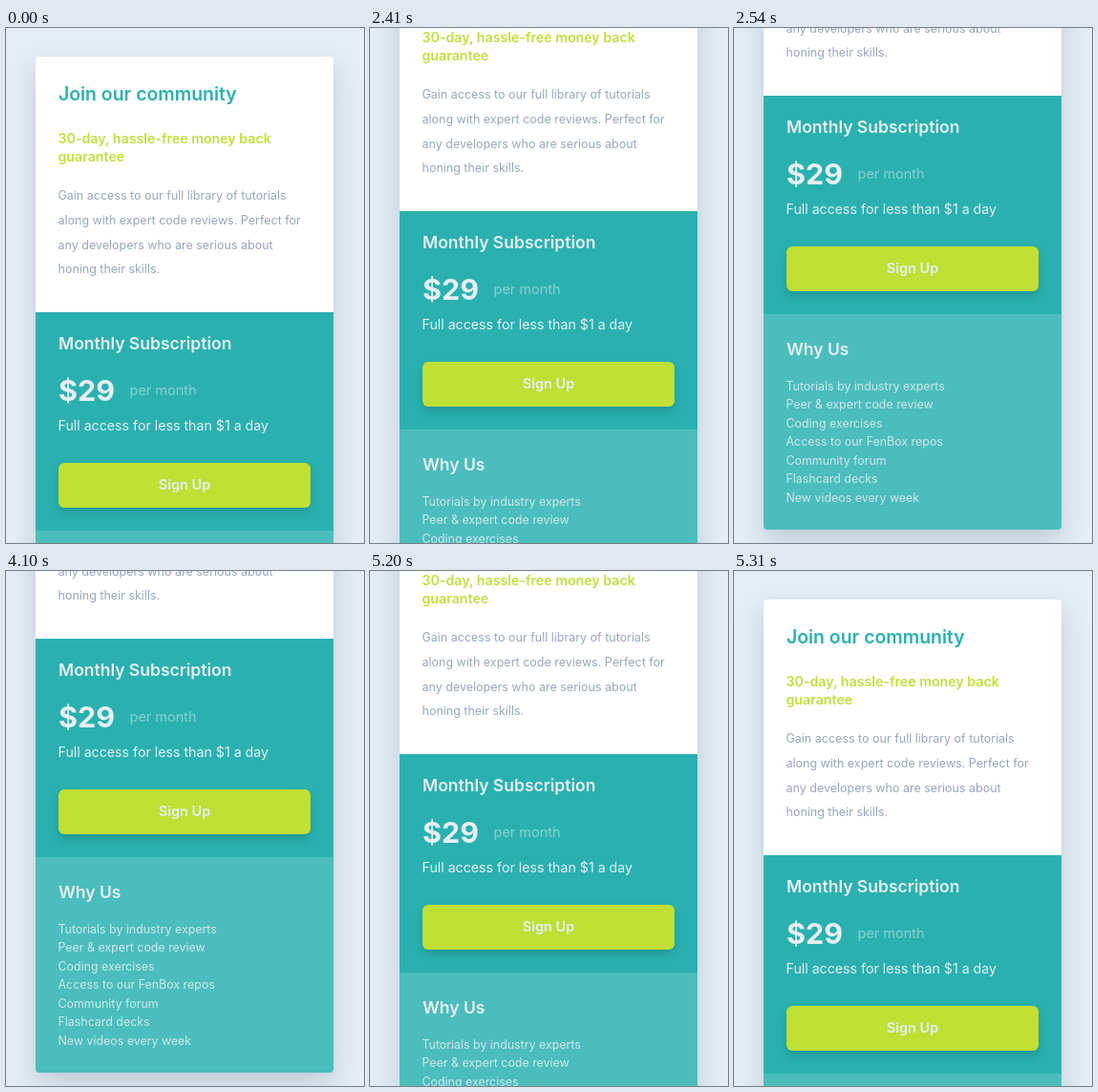
These frames come from a looping animation (375 by 540 pixels, 5.34 s). An HTML page:

```html
<!DOCTYPE html>
<html lang="en">
<head>
<meta charset="utf-8">
<title>Subscription card</title>
<style>
  html, body { margin: 0; width: 100%; height: 100%; overflow: hidden; background: #e5eef5; }
  #stage { position: relative; width: 100%; height: 100%; overflow: clip; contain: strict; }
  #page { position: absolute; left: 0; top: 0; width: 375px; height: 783px; }
  #card {
    position: absolute; left: 31px; top: 30px; width: 312px; height: 723px;
    border-radius: 4px; box-shadow: 0 12px 30px rgba(50, 75, 105, .22);
    background: linear-gradient(#fff 268px, #2ab1af 268px 497px, #4abdbc 497px);
  }
  #button {
    position: absolute; left: 55px; top: 456px; width: 264px; height: 47px;
    border-radius: 6px; background: #bfdf34; box-shadow: 0 5px 10px rgba(0, 60, 70, .22);
  }
  svg { position: absolute; left: 0; top: 0; }
  text { font-family: Inter, Arial, sans-serif; font-optical-sizing: none; fill: #e6eff5; }
  .title { font-size: 19.4px; font-weight: 600; fill: #2bb0ae; }
  .offer { font-size: 14.2px; font-weight: 600; fill: #bfdf40; }
  .body { font-size: 12.5px; fill: #98a6bd; }
  .head { font-size: 17.5px; font-weight: 600; }
  .price { font-size: 30.5px; font-weight: 700; }
  .per { font-size: 14.5px; opacity: .5; }
  .note { font-size: 14.2px; }
  .sign { font-size: 14.5px; font-weight: 600; text-anchor: middle; }
  .item { font-size: 12.4px; opacity: .85; }
</style>
</head>
<body>
<div id="stage">
  <div id="page">
    <div id="card"></div>
    <div id="button"></div>
    <svg id="copy" width="375" height="783"></svg>
  </div>
</div>
<script>
const page = document.getElementById('page');
const copy = document.getElementById('copy');

function write(style, x, y, gap, ...lines) {
  lines.forEach((line, i) => {
    const t = document.createElementNS('http://www.w3.org/2000/svg', 'text');
    t.setAttribute('class', style);
    t.setAttribute('x', x);
    t.setAttribute('y', y + i * gap);
    t.textContent = line;
    copy.append(t);
  });
}

write('title', 55, 76, 0, 'Join our community');
write('offer', 54.5, 121, 19, '30-day, hassle-free money back', 'guarantee');
write('body', 54.5, 180, 25.75,
  'Gain access to our full library of tutorials',
  'along with expert code reviews. Perfect for',
  'any developers who are serious about',
  'honing their skills.');
write('head', 55, 337, 0, 'Monthly Subscription');
write('price', 55, 391, 0, '$29');
write('per', 129.5, 385, 0, 'per month');
write('note', 54.5, 422, 0, 'Full access for less than $1 a day');
write('sign', 187, 484, 0, 'Sign Up');
write('head', 55, 570, 0, 'Why Us');
write('item', 54.5, 607, 19.45,
  'Tutorials by industry experts',
  'Peer & expert code review',
  'Coding exercises',
  'Access to our FenBox repos',
  'Community forum',
  'Flashcard decks',
  'New videos every week');

// Scroll wheel jumps: [start in ms, scroll offset in px]
const LOOP = 5340;
const jumps = [[0, 0], [2410, 106], [2480, 219], [2540, 227], [5140, 219], [5200, 106], [5270, 0]];
const start = performance.now();

function draw() {
  const t = (performance.now() - start) % LOOP;
  const [, offset] = jumps.findLast(([from]) => t >= from);
  page.style.top = -offset + 'px';
  requestAnimationFrame(draw);
}
draw();
</script>
</body>
</html>
```
